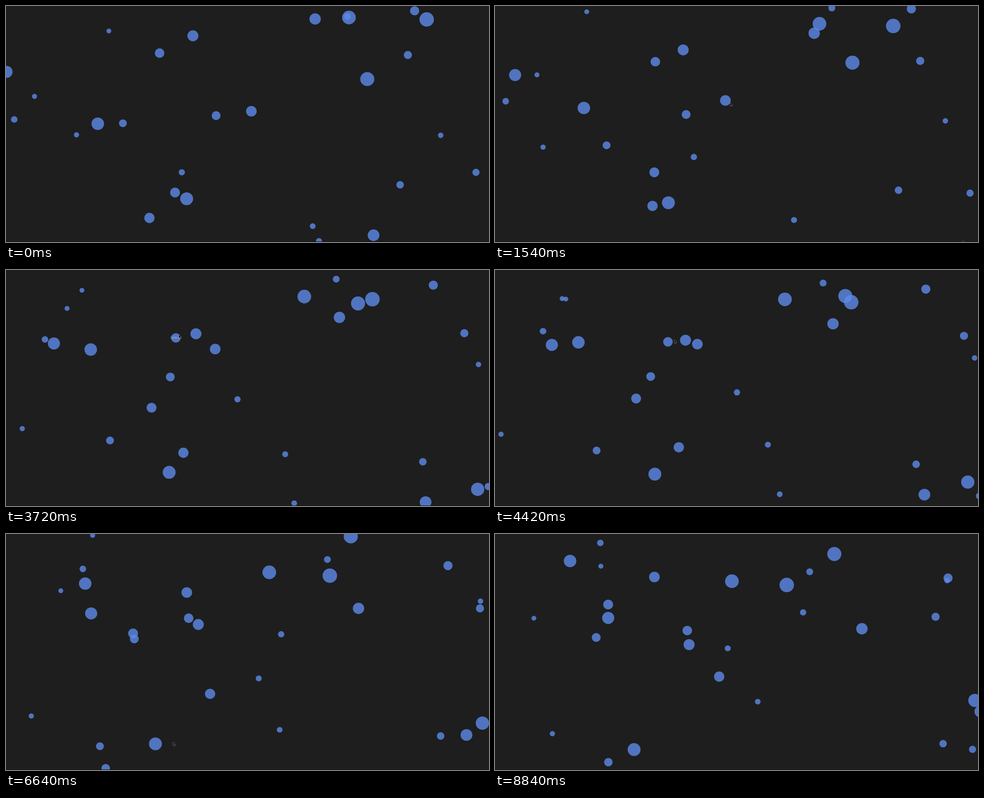
Write an HTML page with a canvas that moves like this. It is 1000 px wide and 491 px high and loops after 8.94 s.

```html
<!DOCTYPE html>
<html lang="en">
<head>
<meta charset="utf-8">
<title>Drifting data points</title>
<style>
  html, body { margin: 0; width: 100%; height: 100%; overflow: hidden; background: #1e1e1e; }
  canvas { display: block; }
</style>
</head>
<body>
<canvas id="stage" width="1000" height="491"></canvas>
<script>
const ctx = document.getElementById('stage').getContext('2d');
const arrow = new Path2D('M0 0 V6.4 L1.5 5.1 L2.6 8 L3.7 7.5 L2.6 4.8 H4.6 Z');
const walls = { left: -1.1, right: 1011, top: -1.1, bottom: 521.1 };

// Straight drift of each ball over one loop, smallest ball first: from x, y to x, y.
// Ends past a wall are folded back by bounce().
const drifts = [
  [213, 52, 79, -180], [59, 188, 221, -72], [146, 268, -124, 417],
  [900, 269, 1088, 95], [635, 458, 543, 696], [648, 489, 480, 235],
  [364, 346, 641, 161], [17, 236, -223, 16], [707, 22, 651, -82],
  [973, 346, 1034, 597], [816, 372, 929, 437], [242, 244, 178, 510],
  [832, 102, 1113, 173], [121, 517, 236, 568], [435, 228, 207, 215],
  [846, 10, 939, -95], [318, 98, 399, 202], [350, 388, 233, 144],
  [297, 441, 466, 295], [508, 219, 328, 88], [387, 62, 402, 232],
  [640, 27, 761, 199], [761, 477, 1020, 675], [1, 137, 237, 175],
  [190, 245, 155, 54], [374, 401, 287, 449], [964, 506, 994, 698],
  [710, 24, 488, 99], [748, 152, 702, -46], [871, 28, 601, 107]
];
const balls = drifts.map(([x0, y0, x1, y1], i) => ({
  x0, y0, x1, y1, radius: 5 + 10 * (i / (drifts.length - 1)) ** 1.2
}));

balls[19].label = 'Data 1';
balls[28].label = 'Data 16';
balls[16].label = 'Data 18';
balls[20].label = 'Data 20';

// Pointer stops: time, x, y
const pointerStops = [
  [1000, 560, 505], [1540, 487, 201], [2440, 736, 97], [3720, 358, 135],
  [5320, 391, 160], [6640, 346, 433], [7200, 330, 505]
];

// The picture advances about ten times a second, with four uneven steps.
const oddDelays = { 0: 120, 9: 120, 32: 80, 60: 120 };
const stepStarts = [];
let duration = 0;
for (let i = 0; i < 89; i++) {
  stepStarts.push(duration);
  duration += oddDelays[i] || 100;
}

const clamp = v => Math.max(0, Math.min(1, v));
const mix = (a, b, k) => a + (b - a) * k;
const ease = k => k * k * (3 - 2 * k);

function bounce(p, low, high) {
  const span = high - low, cycle = 2 * span;
  const q = ((p - low) % cycle + cycle) % cycle;
  return low + Math.min(q, cycle - q);
}

function pointerAt(t) {
  const next = pointerStops.findIndex(([time]) => time > t);
  if (next < 1) return null;
  const [t0, x0, y0] = pointerStops[next - 1], [t1, x1, y1] = pointerStops[next];
  const k = ease((t - t0) / (t1 - t0));
  return { x: mix(x0, x1, k), y: mix(y0, y1, k) };
}

function drawBall(ball, progress, pointer) {
  const x = bounce(mix(ball.x0, ball.x1, progress), walls.left, walls.right);
  const y = bounce(mix(ball.y0, ball.y1, progress), walls.top, walls.bottom);
  ctx.fillStyle = 'rgba(92, 137, 232, 0.8)';
  ctx.beginPath();
  ctx.arc(x, y, ball.radius, 0, 2 * Math.PI);
  ctx.fill();
  if (!ball.label || !pointer) return;
  const depth = ball.radius - Math.hypot(pointer.x - x, pointer.y - y);
  ctx.fillStyle = `rgba(255, 255, 255, ${0.85 * clamp(depth / 2)})`;
  ctx.fillText(ball.label, x, y);
}

function drawPointer({ x, y }) {
  ctx.save();
  ctx.translate(x, y);
  ctx.fillStyle = '#0a0a0a';
  ctx.strokeStyle = '#c4cfe4';
  ctx.lineWidth = 0.8;
  ctx.stroke(arrow);
  ctx.fill(arrow);
  ctx.restore();
}

function draw() {
  const time = performance.now() % duration;
  const t = stepStarts.findLast(start => start <= time);
  const pointer = pointerAt(t);
  ctx.fillStyle = '#1e1e1e';
  ctx.fillRect(0, 0, 1000, 491);
  ctx.font = '6.5px "Liberation Sans", Arial, sans-serif';
  ctx.textAlign = 'center';
  ctx.textBaseline = 'middle';
  balls.forEach(ball => drawBall(ball, t / duration, pointer));
  if (pointer) drawPointer(pointer);
  ctx.fillStyle = '#121212';
  ctx.fillRect(0, 490, 1000, 1);
  requestAnimationFrame(draw);
}
draw();
</script>
</body>
</html>
```
